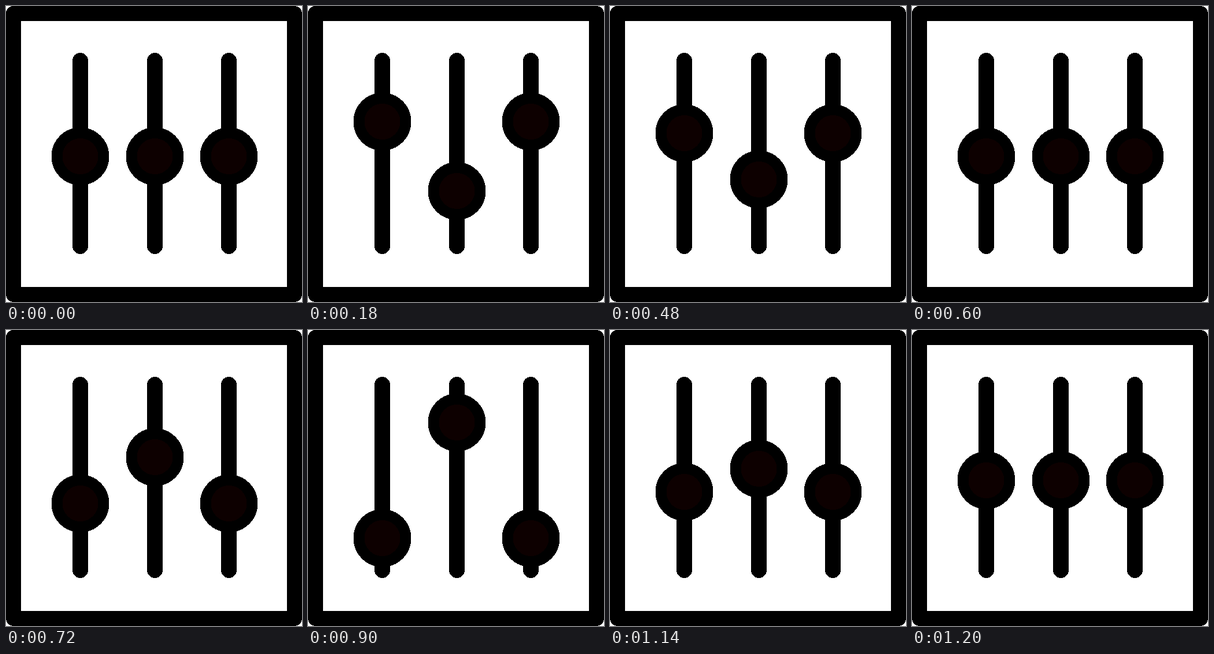
Animation, 512 px wide and 512 px high, one loop 1.26 s. Source, as an HTML page:

```html
<!DOCTYPE html>
<html lang="en">
<head>
<meta charset="utf-8">
<title>Sliders</title>
<style>
  html, body { margin: 0; width: 100%; height: 100%; overflow: hidden; background: #fff; }
  svg { display: block; width: 100vw; height: 100vh; shape-rendering: crispEdges; }
  .frame { fill: #fff; stroke: #000; stroke-width: 26; stroke-linejoin: round; }
  .track { stroke: #000; stroke-width: 27; stroke-linecap: round; }
  .knob { fill: #0d0000; stroke: #000; stroke-width: 19; }
</style>
</head>
<body>
<svg viewBox="0 0 512 512">
  <rect class="frame" x="13" y="13" width="486" height="486"/>
  <path class="track" d="M128.5 94.5V415.5M257.5 94.5V415.5M385.5 94.5V415.5"/>
  <circle class="knob" cx="128.5" cy="260" r="40.5"/>
  <circle class="knob" cx="257.5" cy="260" r="40.5"/>
  <circle class="knob" cx="385.5" cy="260" r="40.5"/>
</svg>
<script>
  const STEP = 60, COUNT = 21, MID = 260, STRIDE = 20;
  const knobs = document.querySelectorAll('.knob');

  // Triangle wave: up 5 strides, down 10, back up 5.
  const offset = i => STRIDE * (Math.abs(i - 5) - 5 - 2 * Math.max(0, i - 15));

  function draw(now) {
    const i = Math.floor(now / STEP) % COUNT;
    knobs.forEach((knob, k) => {
      const dir = k === 1 ? -1 : 1;
      knob.setAttribute('cy', MID + dir * offset(i));
    });
  }

  const start = performance.now();
  function tick() {
    draw(performance.now() - start);
    requestAnimationFrame(tick);
  }
  tick();
</script>
</body>
</html>
```
